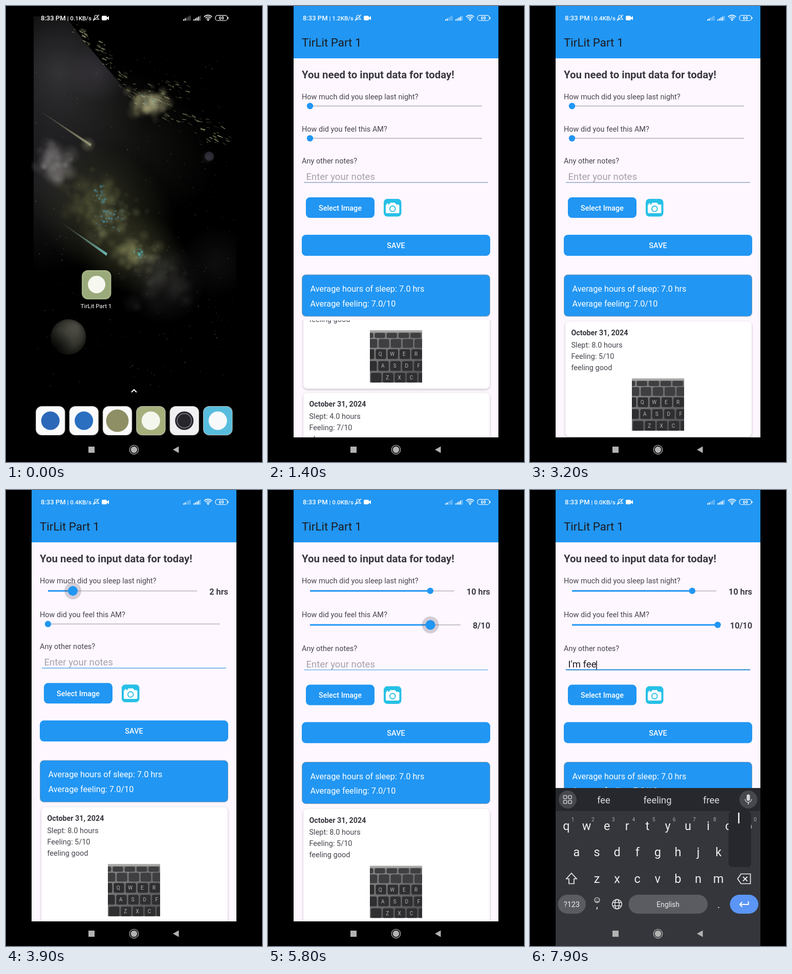
An HTML page with a canvas for the animation above (8 s loop, 500 by 889 pixels).

```html
<!DOCTYPE html>
<html lang="en">
<head>
<meta charset="utf-8">
<title>Sleep diary</title>
<style>
html, body { margin: 0; width: 100%; height: 100%; overflow: hidden; background: #000; }
canvas { display: block; width: 500px; height: 889px; }
</style>
</head>
<body>
<canvas id="stage" width="500" height="889"></canvas>
<script>
const LOOP = 8000, STEP = 100;
const APP = 'TirLit Part 1';
const BLUE = '#2196f3', PAPER = '#fef7ff', INK = '#47444d';
const canvas = document.getElementById('stage');
let g = canvas.getContext('2d');

const clamp = (v) => Math.max(0, Math.min(1, v));
const mix = (a, b, k) => a + (b - a) * k;
const part = (t, a, b) => clamp((t - a) / (b - a));
const ease = (k) => k * k * (3 - 2 * k);
const easeOut = (k) => 1 - (1 - k) ** 3;

// Linear interpolation through [time, value] points
function track(t, pts) {
  let i = 1;
  while (i < pts.length - 1 && t > pts[i][0]) i++;
  const [a, b] = [pts[i - 1], pts[i]];
  return mix(a[1], b[1], part(t, a[0], b[0]));
}

function random(seed) {
  return () => {
    seed = (seed * 1664525 + 1013904223) >>> 0;
    return seed / 4294967296;
  };
}

function text(s, x, y, size, color, weight = 400, align = 'left') {
  g.font = `${weight} ${size}px Roboto, sans-serif`;
  g.textAlign = align;
  g.fillStyle = color;
  g.fillText(s, x, y);
}
function box(x, y, w, h, r, color) {
  g.beginPath();
  g.roundRect(x, y, w, h, r);
  g.fillStyle = color;
  g.fill();
}
function disc(x, y, r, color) {
  g.beginPath();
  g.arc(x, y, r, 0, 7);
  g.fillStyle = color;
  g.fill();
}
function ring(x, y, r, color, w) {
  g.beginPath();
  g.arc(x, y, r, 0, 7);
  g.strokeStyle = color;
  g.lineWidth = w;
  g.stroke();
}
function poly(pts, color, w = 0, close = true) {
  g.beginPath();
  pts.forEach(([x, y]) => g.lineTo(x, y));
  if (close) g.closePath();
  if (w) { g.strokeStyle = color; g.lineWidth = w; g.stroke(); }
  else { g.fillStyle = color; g.fill(); }
}
function line(x1, y1, x2, y2, color, w) {
  poly([[x1, y1], [x2, y2]], color, w, false);
}

// ---------- home screen ----------
function glow(x, y, r, rgb, a, stretch = 1, turn = 0) {
  g.save();
  g.translate(x, y);
  g.rotate(turn);
  g.scale(stretch, 1);
  const f = g.createRadialGradient(0, 0, 0, 0, 0, r);
  f.addColorStop(0, `rgba(${rgb},${a})`);
  f.addColorStop(1, `rgba(${rgb},0)`);
  disc(0, 0, r, f);
  g.restore();
}

function meteor(x1, y1, x2, y2, tip) {
  const f = g.createLinearGradient(x1, y1, x2, y2);
  f.addColorStop(0, 'rgba(120,120,95,.25)');
  f.addColorStop(1, tip);
  poly([[x1, y1], [x2 + 2, y2 - 3], [x2, y2 + 2]], f);
}

function paintWallpaper() {
  const rnd = random(11);
  const bell = () => rnd() + rnd() + rnd() - 1.5;
  const cloud = (x, y, sx, sy, n, size, rgb, a) => {
    for (let i = 0; i < n; i++) {
      glow(x + bell() * sx, y + bell() * sy, size * (.4 + rnd()), rgb, a * (.4 + rnd()));
    }
  };
  const debris = (x1, y1, x2, y2, n, spread) => {
    for (let i = 0; i < n; i++) {
      const k = rnd(), x = mix(x1, x2, k) + bell() * spread, y = mix(y1, y2, k) + bell() * spread;
      const len = 2 + rnd() * 7;
      line(x, y, x + len, y + len * (.2 + rnd() * .5), `rgba(165,165,125,${.2 + rnd() * .6})`, .6 + rnd() * 1.3);
    }
  };
  g.save();
  g.beginPath();
  g.rect(50, 0, 400, 889);
  g.clip();

  g.save();
  g.beginPath();
  [[54, 20], [118, 22], [150, 66], [205, 130], [262, 196], [300, 330], [290, 560], [54, 560]].forEach(p => g.lineTo(...p));
  g.clip();
  glow(105, 130, 190, '72,70,74', .72);
  glow(70, 330, 190, '60,58,64', .55);
  glow(180, 130, 60, '90,84,100', .3);
  g.restore();

  glow(240, 260, 130, '50,50,44', .4, 1.4, .6);
  glow(190, 400, 120, '74,76,50', .6, 1.3, .7);
  glow(250, 480, 80, '80,82,54', .55, 1.4, .4);
  glow(310, 540, 80, '50,48,48', .5);
  glow(410, 500, 70, '40,40,42', .35);
  cloud(95, 308, 32, 42, 55, 15, '150,145,145', .22);
  cloud(165, 370, 60, 50, 70, 14, '120,122,72', .13);
  cloud(205, 415, 50, 50, 70, 12, '135,140,95', .16);
  cloud(255, 482, 46, 28, 60, 12, '150,152,100', .2);
  cloud(295, 530, 60, 50, 50, 16, '75,75,72', .15);
  cloud(280, 187, 36, 24, 60, 13, '165,162,115', .22);
  cloud(182, 372, 12, 22, 22, 3, '70,160,190', .6);
  cloud(205, 414, 22, 22, 40, 3, '80,160,200', .55);
  cloud(262, 482, 10, 12, 14, 3, '80,190,200', .6);
  cloud(285, 182, 16, 10, 12, 3, '90,190,200', .5);
  glow(280, 188, 26, '215,210,165', .5, 1.4, .4);

  debris(128, 32, 185, 85, 32, 12);
  debris(180, 85, 262, 182, 55, 15);
  debris(262, 185, 350, 165, 60, 24);
  debris(310, 205, 425, 262, 36, 16);
  debris(350, 215, 440, 235, 12, 10);

  meteor(62, 202, 165, 272, 'rgba(160,158,125,.9)');
  glow(160, 270, 16, '140,138,110', .5);
  meteor(103, 419, 196, 485, 'rgba(110,190,185,.95)');

  for (let i = 0; i < 420; i++) {
    const x = 55 + rnd() * 390, y = 100 + rnd() * 650;
    if (x < 230 && rnd() < .6) continue;
    g.fillStyle = `rgba(${rnd() < .5 ? '150,150,110' : '135,135,140'},${.15 + rnd() * .65})`;
    const s = .6 + rnd() * .9;
    g.fillRect(x, y, s, s);
  }
  disc(397, 293, 9, '#24222a');
  glow(395, 295, 14, '90,86,100', .3);

  const f = g.createRadialGradient(134, 628, 6, 122, 643, 36);
  f.addColorStop(0, '#4b4a42');
  f.addColorStop(.6, '#34342e');
  f.addColorStop(1, '#171712');
  disc(122, 645, 34.5, f);
  glow(95, 668, 38, '0,0,0', .8);
  g.restore();
}

const wallpaper = document.createElement('canvas');
wallpaper.width = 500;
wallpaper.height = 889;
const screen = g;
g = wallpaper.getContext('2d');
paintWallpaper();
g = screen;

function home(fade, zoom) {
  g.drawImage(wallpaper, 0, 0);
  g.save();
  g.globalAlpha = fade;
  g.translate(250, 444);
  g.scale(zoom, zoom);
  g.translate(-250, -444);
  box(148, 515, 57.5, 57, 12, '#a4b184');
  box(151, 518, 51.5, 51, 10, '#9aaa7a');
  disc(177, 543, 17, '#f6f8f0');
  text(APP, 176, 589, 11.7, '#fff', 400, 'center');
  poly([[245, 753], [250, 748], [255, 753]], '#fff', 2, false);
  const dock = [['#fbfbfb', '#2c68b8'], ['#fbfbfb', '#2a6fc0'], ['#fbfbfb', '#8f8f66'],
    ['#a5b07c', '#f4f7ee'], ['#f1f1f3', '#26262b'], ['#58bddd', '#f7f9fa']];
  dock.forEach(([tile, mark], i) => {
    const x = 58 + i * 65.4;
    box(x, 780, 57.5, 57, 12, '#b9bcb4');
    box(x + 1, 781, 55.5, 55, 11, tile);
    disc(x + 28.7, 808.5, i === 2 ? 22 : 18, mark);
  });
  ring(348.3, 808.5, 14, '#6b6b78', 2);
  g.restore();
}

// ---------- system bars ----------
function statusBar(t) {
  const rate = t < 600 ? '0.1' : t < 2900 ? '1.2' : t < 5400 ? '0.4' : '0.0';
  const c = '#fff';
  text('8:33 PM', 68, 28, 13, c, 500);
  text(`| ${rate}KB/s`, 119.5, 28, 11.6, c, 500);
  g.beginPath();
  g.moveTo(171, 26);
  g.quadraticCurveTo(173, 25, 173, 21);
  g.quadraticCurveTo(173, 18, 176, 18);
  g.quadraticCurveTo(179, 18, 179, 21);
  g.quadraticCurveTo(179, 25, 181, 26);
  g.closePath();
  g.strokeStyle = c;
  g.lineWidth = 1.1;
  g.stroke();
  line(170, 29, 182, 17, c, 1.1);
  box(187, 19, 10, 9, 2, c);
  poly([[196.5, 23], [201, 19.5], [201, 27.5], [196.5, 24.5]], c);
  for (const x of [346, 366]) {
    for (let i = 0; i < 5; i++) {
      const h = 2.5 + i * 1.8;
      g.fillStyle = i < (x < 360 ? 2 : 4) ? c : 'rgba(255,255,255,.4)';
      g.fillRect(x + i * 3.1, 28.5 - h, 2, h);
    }
  }
  g.strokeStyle = c;
  g.lineWidth = 1.6;
  for (const r of [4, 7.3, 10.6]) {
    g.beginPath();
    g.arc(394.7, 28.5, r, -Math.PI * .76, -Math.PI * .24);
    g.stroke();
  }
  disc(394.7, 27.5, 1.5, c);
  g.beginPath();
  g.roundRect(409, 18.3, 23.5, 10.2, 4.5);
  g.lineWidth = 1.2;
  g.stroke();
  box(433.2, 21.5, 1.3, 4, .6, c);
  text('69', 420.8, 26.6, 8.6, c, 700, 'center');
}

function navBar() {
  const c = '#b3b3b3';
  g.fillStyle = c;
  g.fillRect(161, 859, 12, 12);
  disc(250, 865, 6.3, c);
  ring(250, 865, 8.7, c, 1.3);
  poly([[326, 865], [337.5, 858.5], [337.5, 871.5]], c);
}

// ---------- app ----------
const ENTRIES = [
  ['8.0', 5, 'feeling good', keysPhoto],
  ['4.0', 7, 'okay', plainPhoto],
  ['9.0', 9, 'V.V Good', filesPhoto]
];
const PITCH = 233, SCROLL_END = PITCH * 2 + 7;

function photoBase(a, b) {
  const f = g.createLinearGradient(0, 0, 60, 102);
  f.addColorStop(0, a);
  f.addColorStop(1, b);
  g.fillStyle = f;
  g.fillRect(0, 0, 102, 102);
}
function plainPhoto() { photoBase('#6d6a66', '#3a3a3c'); }

function keysPhoto() {
  photoBase('#8c8c8c', '#555557');
  g.fillStyle = '#a9a9a7';
  g.fillRect(0, 0, 102, 4);
  const rows = [[5, 10, -14, ''], [17, 17, -6, ''], [37, 19, -12, ' QWER'], [60, 19, -7, ' ASDF'], [83, 19, 2, ' ZXC']];
  rows.forEach(([y, h, x0, letters], r) => {
    for (let i = 0; i < 6; i++) {
      const x = x0 + i * 23.3;
      box(x, y, 20.5, h, 3, r < 2 ? '#3f3f41' : '#2f2f31');
      if (letters[i]) text(letters[i], x + 9, y + 13, 10, '#b5b5b5', 400, 'center');
    }
  });
}

function filesPhoto() {
  photoBase('#4a4c48', '#282b2b');
  g.rotate(.12);
  for (let i = 0; i < 12; i++) {
    const indent = 8 + [14, 22, -2, 10, 10, -4, 6, 6, 4, -8, -6, 2][i];
    const y = -8 + i * 9.4;
    g.fillStyle = i % 3 ? '#98906a' : '#a9aaa6';
    g.fillRect(indent, y, 4, 4);
    g.fillStyle = 'rgba(190,192,185,.55)';
    g.fillRect(indent + 8, y + .5, [62, 70, 16, 26, 38, 20, 56, 42, 34, 20, 18, 26][i], 2.6);
  }
}

function card([hours, mood, note, photo], y) {
  g.save();
  g.shadowColor = 'rgba(0,0,0,.25)';
  g.shadowBlur = 4;
  g.shadowOffsetY = 1.5;
  box(69, y, 364, 225, 8, '#fff');
  g.restore();
  text('October 31, 2024', 80.5, y + 27, 14.3, '#37343c', 700);
  text(`Slept: ${hours} hours`, 80.5, y + 50.5, 14.5, INK);
  text(`Feeling: ${mood}/10`, 80.5, y + 72.5, 14.5, INK);
  text(note, 80.5, y + 94.5, 14.5, INK);
  g.save();
  g.translate(199, y + 111);
  g.beginPath();
  g.rect(0, 0, 102, 102);
  g.clip();
  photo();
  g.restore();
}

function list(t, dy) {
  const scroll = SCROLL_END * (t < 2200 ? ease(part(t, 1200, 1900)) : 1 - ease(part(t, 2300, 2900)));
  g.save();
  g.beginPath();
  g.rect(58, 613 + dy, 384, 841 - 613 - dy);
  g.clip();
  ENTRIES.forEach((e, i) => {
    const y = 615 + dy + i * PITCH - scroll;
    if (y < 841 && y > 380) card(e, y);
  });
  const pull = part(t, 1800, 1950) * (1 - part(t, 2050, 2350));
  if (pull) {
    g.beginPath();
    g.ellipse(335, 858, 165, 50 * pull, 0, 0, 7);
    g.fillStyle = `rgba(33,150,243,${.2 * pull})`;
    g.fill();
  }
  g.restore();
}

function slider(y, value, max, label, held) {
  let end = 418;
  if (label) {
    text(label, 434, y + 7, 16.3, '#3f3c45', 700, 'right');
    end = 410 - g.measureText(label).width;
  }
  const x = 82 + (end - 82) * value / max;
  line(82, y, end, y, '#c6c2ca', 2);
  if (value) line(82, y, x, y, BLUE, 3);
  if (held) disc(x, y, 16.5, 'rgba(85,85,100,.26)');
  disc(x, y, held ? 9.5 : 6.2, BLUE);
}

function cameraTile(y) {
  box(226, y, 34.5, 34.5, 7, '#27c0e6');
  box(230, y + 11, 26.5, 17, 2, '#fff');
  poly([[236, y + 11.5], [239, y + 7.5], [248, y + 7.5], [251, y + 11.5]], '#fff');
  box(231.5, y + 8.8, 3.5, 2, 1, '#fff');
  disc(243.3, y + 19.3, 6.3, '#27c0e6');
  disc(243.3, y + 19.3, 4.4, '#fff');
}

function app(t, typed) {
  const sleepTouched = t >= 3800, moodTouched = t >= 5500;
  const sleep = Math.round(track(t, [[3800, 0], [4200, 7], [4500, 11], [4800, 11], [5000, 10]]));
  const mood = Math.round(track(t, [[5500, 1], [5900, 10]]));
  const d1 = sleepTouched ? 3.3 : 0, d2 = moodTouched ? 3.3 : 0, dy = d1 + d2;

  g.fillStyle = PAPER;
  g.fillRect(50, 0, 400, 841);
  g.fillStyle = BLUE;
  g.fillRect(50, 0, 400, 102);
  text(APP, 66, 79, 22.4, '#1d1b20');
  text('You need to input data for today!', 66, 140.5, 20.4, '#3b3841', 700);

  text('How much did you sleep last night?', 66, 182, 14.5, INK);
  slider(195 + d1 / 2, sleep, 12, sleepTouched && `${sleep} hrs`, sleepTouched && t < 5200);
  text('How did you feel this AM?', 66, 244.5 + d1, 14.5, INK);
  slider(258 + d1 + d2 / 2, moodTouched ? mood : 0, 10, moodTouched && `${mood}/10`, moodTouched && t < 6200);

  text('Any other notes?', 66, 307 + dy, 14.5, INK);
  const focus = t >= 6400;
  text(typed || 'Enter your notes', 74.5, 339 + dy, 18.6, typed ? '#1d1b20' : '#a5a0a9');
  if (focus && (typed || t % 1000 < 500)) {
    const x = 74.5 + (typed ? g.measureText(typed).width : 0);
    line(x + .5, 326 + dy, x + .5, 343.5 + dy, '#55525c', 2);
  }
  line(70, 344 + dy, 430, 344 + dy, focus ? '#2788d4' : sleepTouched ? '#5fa9e2' : '#8fa6c4', focus ? 2 : 1.4);

  box(74, 373 + dy, 134, 40, 8, BLUE);
  text('Select Image', 141, 398.7 + dy, 14.4, '#fff', 500, 'center');
  cameraTile(376 + dy);
  box(66, 446 + dy, 368, 41, 8, BLUE);
  text('SAVE', 250, 472 + dy, 14.5, '#fff', 500, 'center');

  box(66, 523.5 + dy, 368, 82, 8, '#7f9bb3');
  box(67, 524.5 + dy, 366, 80, 7, BLUE);
  text('Average hours of sleep: 7.0 hrs', 82.5, 557 + dy, 16.3, '#fff');
  text('Average feeling: 7.0/10', 82.5, 585.5 + dy, 16.3, '#fff');
  list(t, dy);
}

// ---------- keyboard ----------
const ROWS = [['qwertyuiop', 71, 655], ['asdfghjkl', 91, 706], ['zxcvbnm', 130.5, 758]];
const GAP = 39.6;
// [press time, key, text after release, suggestions]
const STROKES = [
  [6900, 'i', 'i', 'in,I,is'], [7100, 'm', 'im', "im,I'm,in"], [7300, '', "I'm ", 'not,going,so'],
  [7400, 'f', "I'm f", 'for,from,fine'], [7600, 'e', "I'm fe", 'few,feel,feeling'],
  [7700, 'e', "I'm fee", 'fee,feeling,free'], [7900, 'l', "I'm feel", 'feel,feeling,feels']
];

function stripIcons() {
  const c = '#a6a8ac', dim = '#66686d';
  text('GIF', 132, 609, 14, dim, 900, 'center');
  poly([[182, 594], [200, 594], [200, 606], [194, 612], [182, 612]], dim, 1.6);
  disc(187.5, 600, 1.3, dim);
  disc(194.5, 600, 1.3, dim);
  g.beginPath();
  g.arc(191, 603, 4, .2, 2.9);
  g.stroke();
  g.beginPath();
  g.roundRect(242, 595, 15.5, 17, 2);
  g.strokeStyle = c;
  g.lineWidth = 1.7;
  g.stroke();
  box(246, 593, 8, 5, 1.5, c);
  for (const y of [601, 604.5, 608]) line(245.5, y, 254, y, c, 1.4);
  for (let i = 0; i < 8; i++) {
    const a = i * Math.PI / 4;
    line(308, 603.5, 308 + 8.5 * Math.cos(a), 603.5 + 8.5 * Math.sin(a), c, 4);
  }
  ring(308, 603.5, 4.7, c, 3.6);
  disc(308, 603.5, 3, '#27282d');
  disc(367, 603, 8.7, c);
  for (const [x, y] of [[362, 603], [364.5, 598.5], [369.5, 598.5], [372, 603]]) disc(x, y, 1.4, '#27282d');
  disc(371.5, 609.5, 3.2, '#27282d');
}

function keyboard(t, typed, hints, pressed) {
  const c = '#eceded';
  g.save();
  g.translate(0, 308 * (1 - easeOut(part(t, 6350, 6650))));
  g.fillStyle = '#34363b';
  g.fillRect(50, 581, 400, 308);
  g.fillStyle = '#27282d';
  g.fillRect(50, 581, 400, 45);
  disc(73.5, 603.5, 17.5, '#46484d');
  disc(426.5, 603.5, 17.5, '#46484d');
  g.strokeStyle = '#c3c5c8';
  g.lineWidth = 1.6;
  for (const x of [65.5, 75]) for (const y of [595.5, 605]) {
    g.beginPath();
    g.roundRect(x, y, 6.3, 6.3, 1.5);
    g.stroke();
  }
  box(423.2, 593.5, 6.4, 12.5, 3.2, '#d6d7d9');
  g.beginPath();
  g.arc(426.4, 602.5, 6.3, 0, Math.PI);
  g.stroke();
  line(426.4, 609, 426.4, 613, '#d6d7d9', 1.8);
  if (typed) hints.split(',').forEach((w, i) => text(w, 144 + i * 105, 610.5, 18.4, '#dcdde0', 400, 'center'));
  else stripIcons();

  ROWS.forEach(([keys, x0, y], r) => [...keys].forEach((k, i) => {
    text(k, x0 + i * GAP, y + 8, 23.5, c, 400, 'center');
    if (!r) text(String((i + 1) % 10), x0 + 12.5 + i * GAP, 645.5, 10, '#a9abaf', 400, 'center');
  }));
  poly([[81, 747], [91, 758], [86, 758], [86, 767.5], [76, 767.5], [76, 758], [71, 758]], c, 1.7);
  poly([[405.5, 758], [412, 748.5], [430.5, 748.5], [430.5, 767.5], [412, 767.5]], c, 1.7);
  line(416, 754, 424.5, 762.5, c, 1.8);
  line(424.5, 754, 416, 762.5, c, 1.8);

  box(54.5, 789, 54.5, 37, 18.5, '#5a5c61');
  text('?123', 81.5, 812.5, 14.5, c, 400, 'center');
  ring(131, 799.5, 5, c, 1.1);
  disc(129.2, 798, .8, c);
  disc(132.8, 798, .8, c);
  g.beginPath();
  g.arc(131, 800, 2.6, .2, 2.9);
  g.stroke();
  text(',', 131, 815, 20, c, 400, 'center');
  ring(170, 807.5, 9.3, c, 1.5);
  g.beginPath();
  g.ellipse(170, 807.5, 4.2, 9.3, 0, 0, 7);
  g.stroke();
  line(161.5, 804.3, 178.5, 804.3, c, 1.4);
  line(161.5, 810.7, 178.5, 810.7, c, 1.4);
  box(192.5, 789, 154.5, 37, 18.5, '#5a5c61');
  text('English', 269.5, 812.5, 13.8, c, 400, 'center');
  text('.', 368.5, 815, 20, c, 400, 'center');
  box(390.5, 789, 55.5, 37, 18.5, '#5b95f5');
  poly([[426.5, 802], [426.5, 808], [410, 808]], '#fff', 2, false);
  poly([[414.5, 803.3], [409.8, 808], [414.5, 812.7]], '#fff', 2, false);

  const row = pressed && ROWS.find(r => r[0].includes(pressed));
  if (row) {
    const x = row[1] + row[0].indexOf(pressed) * GAP, y = row[2];
    box(x - 20, y - 80, 44, 109, 7, '#27282d');
    text(pressed, x, y - 56, 27, '#fff', 400, 'center');
  }
  navBar();
  g.restore();
}

// ---------- main ----------
function draw(t) {
  g.fillStyle = '#000';
  g.fillRect(0, 0, 500, 889);
  const open = easeOut(part(t, 200, 650));
  if (open < 1) home(1 - part(t, 200, 450), 1 - .12 * open);

  let typed = '', hints = '', pressed = '';
  for (const [at, key, out, words] of STROKES) {
    if (t >= at + STEP) { typed = out; hints = words; }
    else if (t >= at) pressed = key;
  }

  if (open > 0) {
    const x = mix(148, 50, open), y = mix(515, 0, open), w = mix(57.5, 400, open), h = mix(57, 841, open);
    g.save();
    g.beginPath();
    g.roundRect(x, y, w, h, 14 * (1 - open));
    g.clip();
    g.fillStyle = PAPER;
    g.fillRect(x, y, w, h);
    if (t >= 600) {
      g.translate(x, y);
      g.scale(w / 400, w / 400);
      g.translate(-50, 0);
      app(t, typed);
    }
    g.restore();
  }
  if (open < .9 || t >= 600) statusBar(t);
  navBar();
  if (t >= 6400) keyboard(t, typed, hints, pressed);
}

function tick() {
  draw(Math.floor(performance.now() % LOOP / STEP) * STEP);
  requestAnimationFrame(tick);
}
tick();
</script>
</body>
</html>
```
